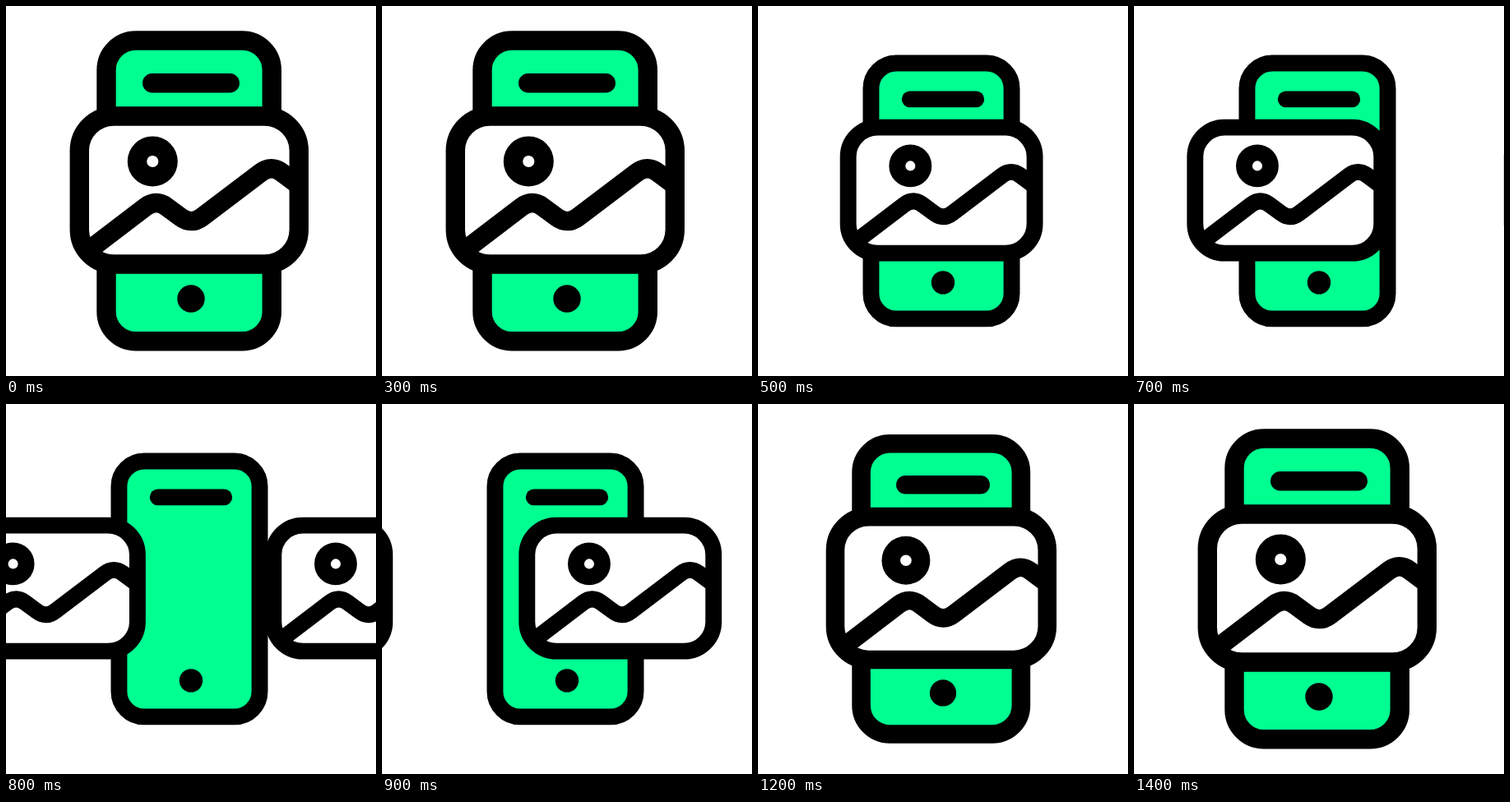
Animation of 450 by 450 pixels, one loop 1500 ms. Source, as an HTML page:

```html
<!DOCTYPE html>
<html lang="en">
<head>
<meta charset="utf-8">
<title>Phone gallery swipe</title>
<style>
  html, body { margin: 0; width: 100%; height: 100%; overflow: hidden; background: #fff; }
  svg { display: block; width: 100%; height: 100%; }
</style>
</head>
<body>
<svg viewBox="0 0 450 450">
  <defs>
    <g id="card">
      <rect x="89.3" y="134" width="267" height="180" rx="42" fill="#fff"/>
      <circle cx="178.3" cy="189" r="18.8"/>
      <path d="M100 297.5L169.5 244.5Q182.5 234.7 195.5 244.3L212.5 256.9Q225.5 266.5 238.5 256.6L309.5 202.8Q322.5 192.9 335.5 202.6L357 218.6"/>
    </g>
  </defs>
  <g id="scene" fill="none" stroke="#000" stroke-width="23.4">
    <rect x="122" y="42" width="201.3" height="365.8" rx="36" fill="#00ff91"/>
    <path d="M177.7 93.7H272.3" stroke-linecap="round"/>
    <circle cx="225" cy="356" r="16.7" fill="#000" stroke="none"/>
    <use id="leaving" href="#card"/>
    <use id="arriving" href="#card"/>
  </g>
</svg>
<script>
  const LOOP = 1500, STEP = 100, SMALL = 0.85;
  const [scene, leaving, arriving] =
    ["scene", "leaving", "arriving"].map(id => document.getElementById(id));

  // Eased progress from 0 to 1 between two times
  function ease(t, start, end) {
    const p = Math.min(1, Math.max(0, (t - start) / (end - start)));
    return p * p * (3 - 2 * p);
  }

  const shift = (card, x) => card.setAttribute("transform", `translate(${x} 0)`);

  function draw(now) {
    // The animation plays at ten pictures per second
    const t = Math.floor((now % LOOP) / STEP) * STEP;
    const shrink = ease(t, 300, 500) - ease(t, 1067, 1260);
    const scale = 1 - (1 - SMALL) * shrink;
    const swipe = ease(t, 634, 996);

    scene.setAttribute("transform", `translate(225 225) scale(${scale}) translate(-225 -225)`);
    shift(leaving, -474.6 * swipe);
    shift(arriving, 451.5 * (1 - swipe));
  }

  function tick() {
    draw(performance.now());
    requestAnimationFrame(tick);
  }
  tick();
</script>
</body>
</html>
```
